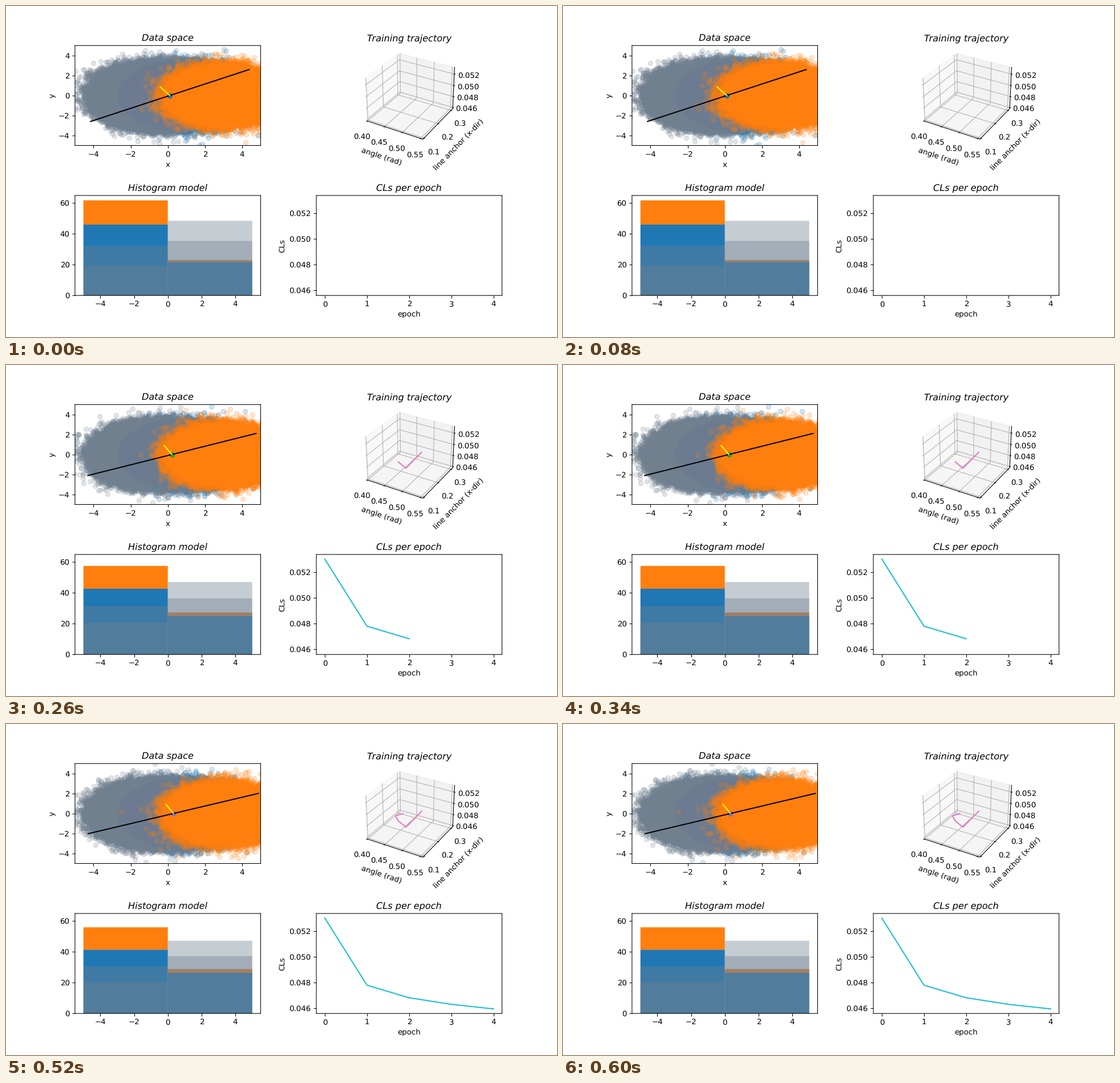
A matplotlib script that plays this animation: 966 px wide and 580 px high, repeating every 0.65 s.

```python
import math

import numpy as np
import matplotlib.pyplot as plt
from matplotlib.animation import FuncAnimation
from matplotlib.patches import Ellipse

DPI = 96.6
STEPS = 5
GREY = "slategray"
GREY_CORE = "#71808f"

# Training state per epoch
angle = np.array([0.546, 0.4805, 0.4348, 0.408, 0.414])
anchor = np.array([0.107, 0.164, 0.218, 0.26, 0.30])
cls = np.array([0.05302, 0.04778, 0.0468, 0.04629, 0.04593])

# Unit normal blobs on the x axis: centre, samples, point colour, core colour
BLOBS = [(1, 350_000, "C0", "C0"), (-1, 350_000, GREY, GREY_CORE),
         (0, 350_000, GREY, GREY_CORE), (3, 200_000, "C1", "C1")]
TAIL = 3.1      # points closer than this merge into a solid core
CORE = 3.25

# Unsnapped lines and unhinted text keep true sub-pixel sizes
plt.rcParams.update({"font.family": "DejaVu Sans", "font.size": 10,
                     "text.hinting": "none", "path.snap": False})
fig = plt.figure(figsize=(966.001 / DPI, 580.001 / DPI), dpi=DPI)
fig.subplots_adjust(left=0.1252, right=0.9002, bottom=0.1255, top=0.8806,
                    wspace=0.3, hspace=0.5)
ax_data = fig.add_subplot(221)
ax_path = fig.add_subplot(222, projection="3d")
ax_hist = fig.add_subplot(223)
ax_cls = fig.add_subplot(224)

for ax, name in [(ax_data, "Data space"), (ax_path, "Training trajectory"),
                 (ax_hist, "Histogram model"), (ax_cls, "CLs per epoch")]:
    ax.set_title(name, style="italic", y=1.0)
    ax.title.set_y(1.0)     # 3D axes lower their title by default


def tail_points(rng, centre, samples):
    """Samples of a unit normal blob that lie outside its core."""
    n = int(samples * math.exp(-TAIL ** 2 / 2))
    r = np.sqrt(TAIL ** 2 + 2 * rng.exponential(size=n))
    phi = rng.uniform(0, 2 * np.pi, n)
    return np.column_stack([centre + r * np.cos(phi), r * np.sin(phi)])


def disc(centre, radius, color):
    return ax_data.add_patch(
        Ellipse((centre, 0), 2 * radius, 2 * radius, color=color, lw=0))


# Data space
clouds = []
for centre, _, color, core in BLOBS:
    if color == "C1":
        # the hidden blob tints the grey ones slightly
        shade = disc(1, 3.7, "#6c7b90")
        shade.set_clip_path(Ellipse((0, 0), 6.7, 6.7,
                                    transform=ax_data.transData))
    disc(centre, CORE, core)
    clouds.append(ax_data.scatter([], [], color=color, alpha=0.2))
dot = ax_data.scatter([], [])
cut, = ax_data.plot([], [], color="black")
normal, = ax_data.plot([], [], color="yellow")
ax_data.set(xlim=(-5, 5), ylim=(-5, 5), xlabel="x", ylabel="y")

# Training trajectory
path, = ax_path.plot(angle, anchor, cls, color="C6")
ax_path.set_xticks([0.40, 0.45, 0.50, 0.55])
ax_path.set_yticks([0.1, 0.2, 0.3])
ax_path.set_zticks([0.046, 0.048, 0.050, 0.052])
ax_path.set_xlabel("angle (rad)")
ax_path.set_ylabel("line anchor (x-dir)")


# Histogram model
def bars(color, alpha=None):
    return ax_hist.bar([-2.5, 2.5], [1, 1], width=5, color=color, alpha=alpha)


nominal, signal = bars("C0"), bars("C1")
up, down = bars(GREY, 0.4), bars(GREY, 0.4)
ax_hist.set(xlim=(-5.5, 5.5), ylim=(0, 64.85))

# CLs per epoch
curve, = ax_cls.plot(range(STEPS), cls, color="C9")
ax_cls.set(xlabel="epoch", ylabel="CLs")


def yields(centre, total, k):
    """Expected counts on both sides of the cut."""
    z = (centre - anchor[k]) * math.sin(angle[k])
    left = total * 0.5 * (1 + math.erf(z / math.sqrt(2)))
    return np.array([left, total - left])


def set_bars(group, heights, base=(0, 0)):
    for bar, h, y in zip(group, heights, base):
        bar.set_y(y)
        bar.set_height(h)


def update(k):
    rng = np.random.default_rng(40 + k)
    for cloud, (centre, samples, _, _) in zip(clouds, BLOBS):
        cloud.set_offsets(tail_points(rng, centre, samples))

    a, c, s = anchor[k], math.cos(angle[k]), math.sin(angle[k])
    dot.set_offsets([[a, 0]])
    dot.set_color(f"C{k}")
    cut.set_data([a - 5 * c, a + 5 * c], [-5 * s, 5 * s])
    normal.set_data([a, a - s], [0, c])

    bkg = yields(1, 67.8, k)
    set_bars(nominal, bkg)
    set_bars(signal, yields(3, 16.8, k), bkg)
    set_bars(up, yields(0, 67.8, k))
    set_bars(down, yields(-1, 67.5, k))

    n = k + 1
    path.set_data_3d(angle[:n], anchor[:n], cls[:n])
    curve.set_data(range(n), cls[:n])
    return [*clouds, dot, cut, normal, path, curve]


anim = FuncAnimation(fig, update, frames=STEPS, interval=130,
                     repeat=True, repeat_delay=0, blit=False)
plt.show()
```
